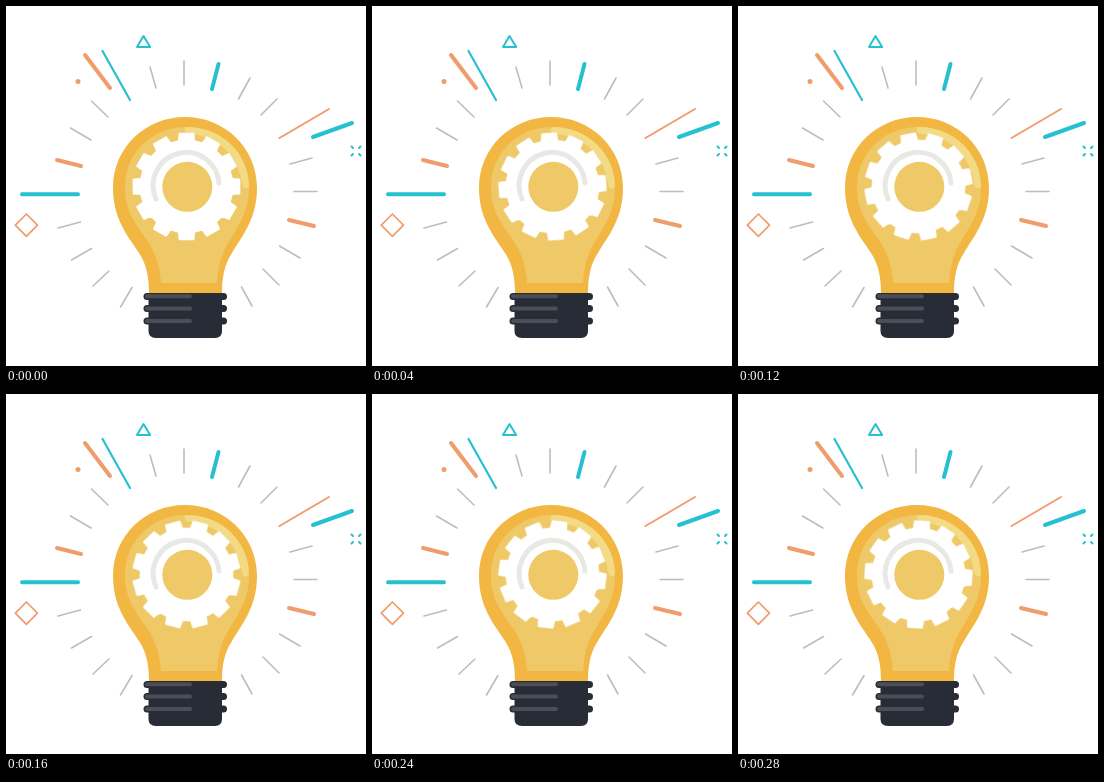
Write an HTML page that moves like this. It is 360 px wide and 360 px high and loops after 320 ms.

```html
<!DOCTYPE html>
<html lang="en">
<head>
<meta charset="utf-8">
<title>Idea bulb</title>
<style>
  html, body { margin: 0; width: 100%; height: 100%; overflow: hidden; background: #fff; }
  svg { display: block; width: 100vw; height: 100vh; }
  .line { fill: none; stroke-linecap: round; stroke-linejoin: round; }
  .gray { stroke: #bdbdb9; stroke-width: 1.6; }
  .teal { stroke: #27c0d0; }
  .orange { stroke: #f09c6c; }
  .thick { stroke-width: 4; }
  .thin { stroke-width: 2.2; }
  #gear {
    transform-origin: 180.5px 180.5px;
    animation: turn 320ms steps(8, end) infinite;
  }
  /* One tooth pitch per loop */
  @keyframes turn { to { transform: rotate(-30deg); } }
</style>
</head>
<body>
<svg viewBox="0 0 360 360">
  <path class="line gray" d="M178 55V79 M144 61L150 82 M244 72L232.500 93 M271 93L255 109
    M306 152L284 158 M288 185.500H311 M273.500 240L294 252 M257 263L273 279
    M235.500 281L246 300 M126 281.500L114.500 301 M103 265L87 280 M85.500 242.500L65.500 254
    M74.500 216L52 222 M85 134L64.500 122 M102 111L85.500 95"/>

  <path class="line teal thick" d="M212.500 58L206 83 M346 117L307 131 M16 188.200H72"/>
  <path class="line teal thin" d="M96.500 45L124 94"/>
  <path class="line teal" stroke-width="2" d="M137.500 30L131 41H144.200Z"/>
  <path class="line teal" stroke-width="2" d="M345.500 140.500L347 142 M354.500 140.500L353 142 M345.500 149.500L347 148 M354.500 149.500L353 148"/>
  <path class="line orange thick" d="M79 49L104 82 M51 154L75 160 M283 214L308 220"/>
  <path class="line orange" stroke-width="2" d="M323 103L273.500 132"/>
  <path class="line orange" stroke-width="1.700" d="M20.400 208L31.500 219.200L20.400 230.400L9.300 219.200Z"/>
  <circle cx="72" cy="75.500" r="2.500" fill="#f09c6c"/>

  <path fill="#f2b742" d="M143 288C143 272 141 259 133 247C122 230 107 213 107 182
    C107 142 139 111 179 111C219 111 251 142 251 182C251 213 236 230 226 247
    C218 259 216 272 216 288Z"/>
  <path fill="#efc967" d="M155 277C154 259 149 246 141 234C130 218 119 206 119 181
    C119 147 146 121 180 121C215 121 243 148 243 182C243 206 231 222 221 239
    C214 251 212 264 211 277Z"/>
  <path fill="#f3da84" d="M181 121C216 121 243 148 243 180C241 184 237 183 236 178
    C233 150 212 130 183 128C178 127 177 122 181 121Z"/>

  <path id="gear" fill="#fff" stroke="#fff" stroke-width="2" stroke-linejoin="round"/>
  <path fill="none" stroke="#e8e9e5" stroke-width="5" stroke-linecap="round"
    d="M150 193A33 33 0 1 1 213 177"/>
  <circle cx="181.300" cy="180.800" r="25" fill="#efc967"/>

  <g fill="#282c36">
    <path d="M142.500 288H216V325Q216 332 209 332H150Q142.500 332 142.500 325Z"/>
    <rect x="137.500" y="287" width="83.500" height="7" rx="3.500"/>
    <rect x="137.500" y="299" width="83.500" height="7" rx="3.500"/>
    <rect x="137.500" y="311.500" width="83.500" height="7" rx="3.500"/>
  </g>
  <path class="line" stroke="#4b4e56" stroke-width="4" d="M141 290.300H184 M141 302.500H184 M141 315H184"/>
</svg>
<script>
  const center = 180.5, teeth = 12;
  const polar = (radius, degrees) => {
    const a = (degrees - 90) * Math.PI / 180;
    return `${center + radius * Math.cos(a)} ${center + radius * Math.sin(a)}`;
  };
  // Each tooth tapers from a wide root to a narrower tip.
  const tooth = (_, i) => [[46, -9.5], [53.3, -7.5], [53.3, 7.5], [46, 9.5]]
    .map(([radius, offset]) => polar(radius, i * 360 / teeth + offset)).join("L");
  const outline = Array.from({ length: teeth }, tooth).join("L");
  document.getElementById("gear").setAttribute("d", `M${outline}Z`);
</script>
</body>
</html>
```
